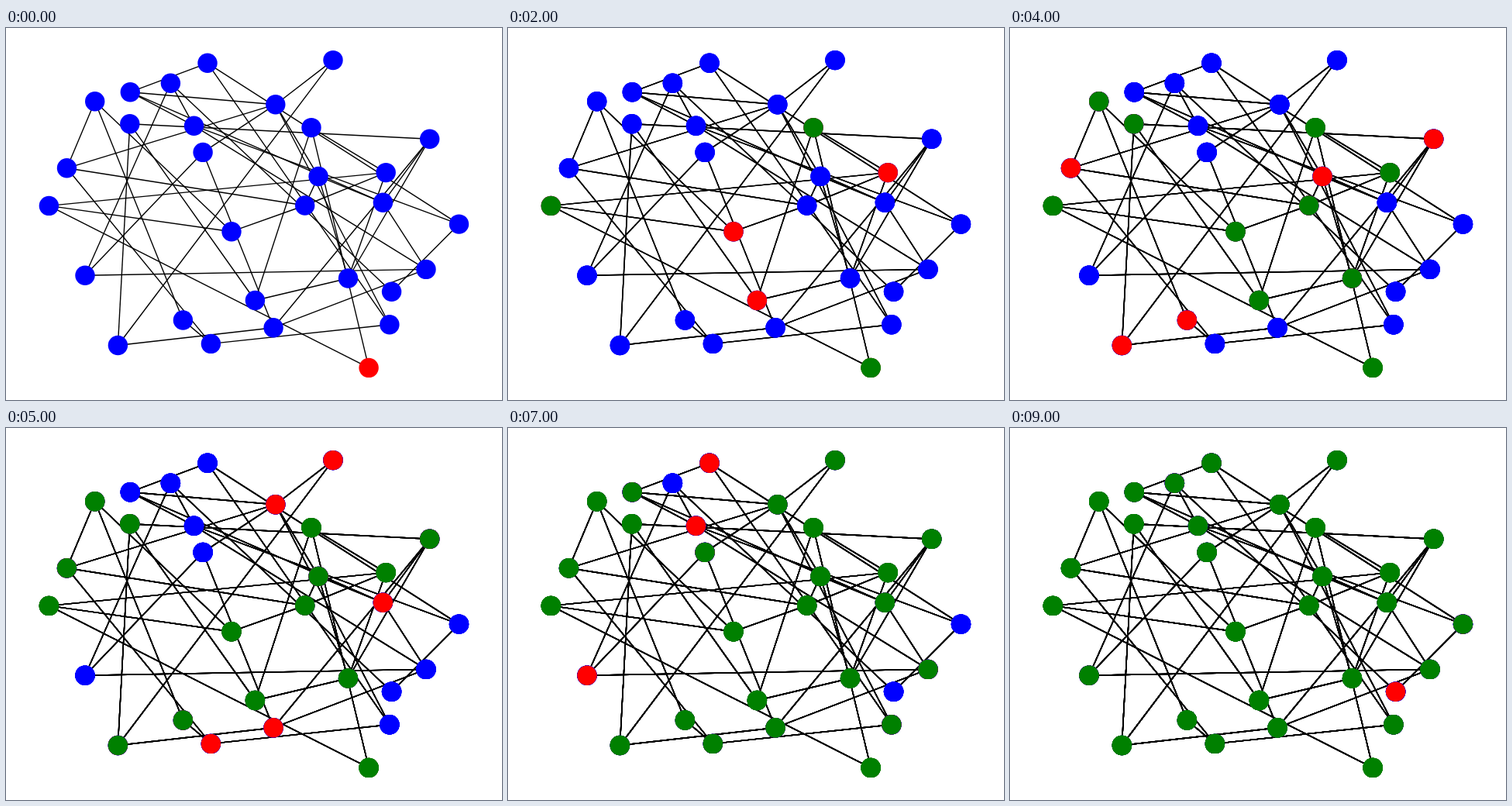
These frames come from a looping animation (640x480 px, 10000 ms). An HTML page with a canvas:

```html
<!DOCTYPE html>
<html lang="en">
<head>
<meta charset="utf-8">
<title>Breadth-first search</title>
<style>
  html, body { margin: 0; width: 100%; height: 100%; overflow: hidden; background: #fff; }
  canvas { display: block; width: 640px; height: 480px; }
</style>
</head>
<body>
<canvas id="stage" width="640" height="480"></canvas>
<script>
const STEP_MS = 1000, STEPS = 10, RADIUS = 12.7, LINE = 1.39, START = 'D';

const nodes = {
  a: [260, 45.3], b: [422, 41.6], c: [212.4, 71.2], d: [160.3, 82.7], e: [114.7, 94.8],
  f: [347.8, 98.7], g: [159.8, 123.7], h: [242.5, 126.2], i: [394, 128.6], j: [546.7, 143.2],
  k: [254.1, 160.4], l: [78.5, 180.8], m: [490.2, 186.6], n: [403.1, 191.4], o: [55.4, 229.4],
  p: [385.7, 229], q: [486.4, 225.3], r: [584.5, 253.1], s: [291, 262.7], t: [542, 311.4],
  u: [102, 319.3], v: [441.5, 323], w: [497.6, 340.3], x: [321.4, 351.5], y: [228.4, 377],
  z: [345.1, 386.7], A: [494.9, 382.8], B: [144.4, 409.5], C: [264.4, 407.4], D: [468.1, 438.4]
};

const links = {
  a: 'dAr', b: 'fB', c: 'uhw', d: 'fqh', e: 'lys', f: 'lknA', g: 'jBx', h: 'rt',
  i: 'mxD', j: 'qzv', k: 'uz', l: 'pC', m: 'opv', n: 'pvq', o: 'sD', p: 's',
  q: 't', r: 'w', t: 'uz', v: 'x', y: 'C', z: 'B', A: 'C'
};

const edges = Object.entries(links).flatMap(([from, list]) => [...list].map(to => [from, to]));

function searchLevels(start) {
  const level = { [start]: 0 };
  const queue = [start];
  for (const current of queue) {
    for (const [from, to] of edges) {
      if (from !== current && to !== current) continue;
      const next = from === current ? to : from;
      if (next in level) continue;
      level[next] = level[current] + 1;
      queue.push(next);
    }
  }
  return level;
}

const level = searchLevels(START);
const ctx = document.getElementById('stage').getContext('2d');

function drawEdges() {
  ctx.strokeStyle = '#000';
  ctx.lineWidth = LINE;
  for (const [from, to] of edges) {
    ctx.beginPath();
    ctx.moveTo(...nodes[from]);
    ctx.lineTo(...nodes[to]);
    ctx.stroke();
  }
}

function drawNodes(step) {
  for (const [name, [x, y]] of Object.entries(nodes)) {
    ctx.fillStyle = level[name] > step ? '#00f' : level[name] === step ? '#f00' : '#008000';
    ctx.beginPath();
    ctx.arc(x, y, RADIUS, 0, 2 * Math.PI);
    ctx.fill();
  }
}

// Each step paints over the earlier ones, so antialiased edges grow darker.
function draw(step) {
  ctx.fillStyle = '#fff';
  ctx.fillRect(0, 0, 640, 480);
  for (let i = 0; i <= step; i++) drawEdges();
  for (let i = 0; i <= step; i++) drawNodes(i);
}

let shown = 0;
const begin = performance.now();
draw(shown);

function tick() {
  const step = Math.floor((performance.now() - begin) / STEP_MS) % STEPS;
  if (step !== shown) draw(shown = step);
  requestAnimationFrame(tick);
}
requestAnimationFrame(tick);
</script>
</body>
</html>
```
